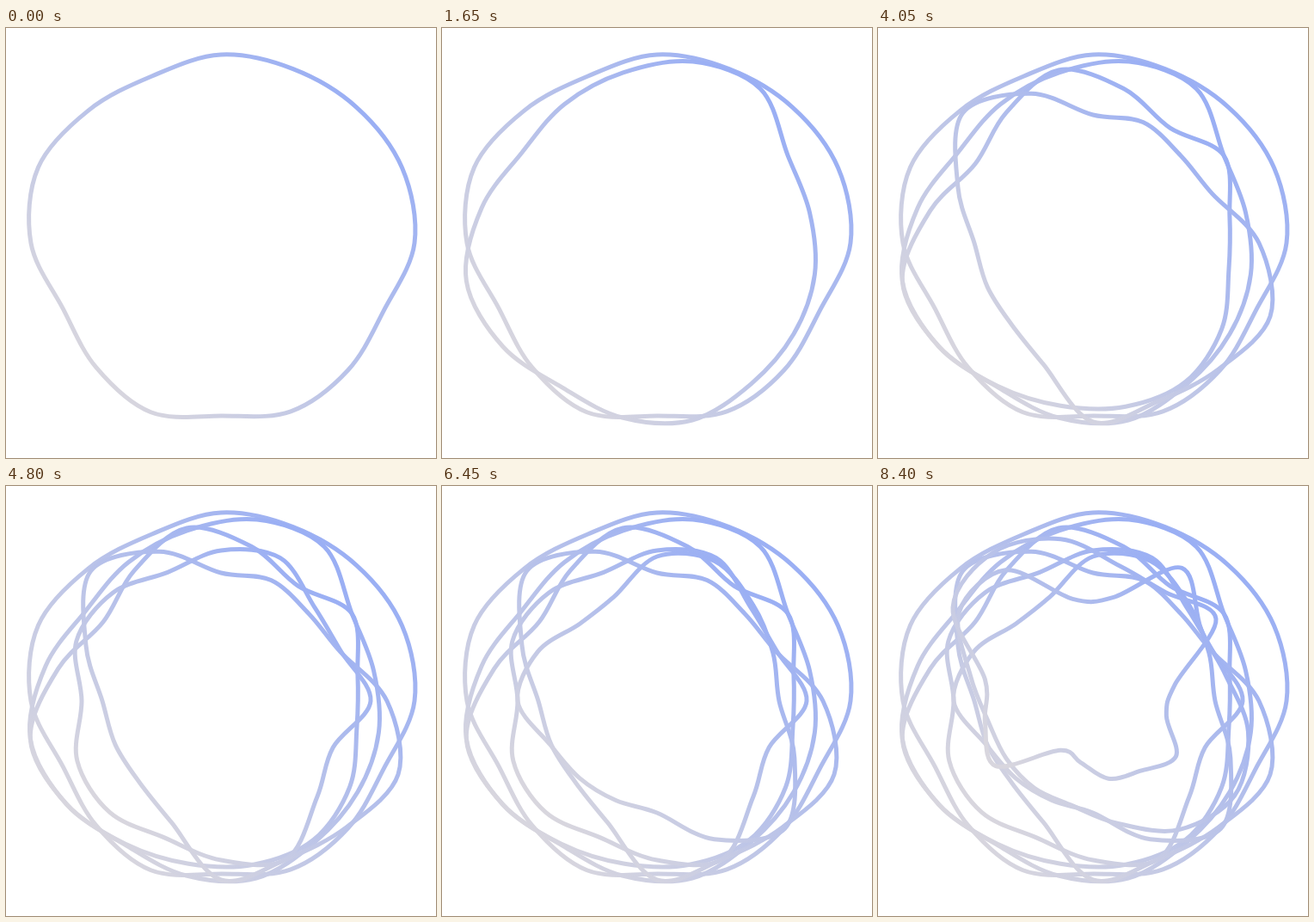
Write an HTML page with a canvas that moves like this. It is 500 by 500 pixels and loops after 9600 ms.

```html
<!DOCTYPE html>
<html lang="en">
<head>
<meta charset="utf-8">
<title>Rings</title>
<style>
html, body { margin: 0; width: 100%; height: 100%; overflow: hidden; background: #fff; }
canvas { display: block; width: 100%; height: 100%; }
</style>
</head>
<body>
<canvas id="stage" width="500" height="500"></canvas>
<script>
const SIZE = 500;
const LOOP = 9600;
const FIRST = 200;   // when the second ring starts to flicker
const GAP = 1200;    // time between two new rings
const BLINK = 250;   // length of one on or off phase
const SETTLE = 1000; // flicker time before a ring stays on
const INSET = 0.14;  // gradient ends, as a share of the ring's box

const ctx = document.getElementById('stage').getContext('2d');
ctx.lineWidth = 5;

// Anchors at equal angles, clockwise from the right; turn is in steps.
function anchors(turn, radii) {
  const step = 2 * Math.PI / radii.length;
  return radii.map((r, i) => {
    const angle = (i + turn) * step;
    return [SIZE / 2 + r * Math.cos(angle), SIZE / 2 + r * Math.sin(angle)];
  });
}

// Closed smooth path through all points.
function smooth(points) {
  const n = points.length;
  const at = i => points[(i + n) % n];
  const path = new Path2D();
  path.moveTo(...at(0));
  for (let i = 0; i < n; i++) {
    const [ax, ay] = at(i - 1), [bx, by] = at(i);
    const [cx, cy] = at(i + 1), [dx, dy] = at(i + 2);
    path.bezierCurveTo(
      bx + (cx - ax) / 6, by + (cy - ay) / 6,
      cx - (dx - bx) / 6, cy - (dy - by) / 6,
      cx, cy);
  }
  path.closePath();
  return path;
}

// Grey at the lower left to blue at the upper right of the ring's own box.
function shade(points) {
  const span = axis => {
    const values = points.map(p => p[axis]);
    const low = Math.min(...values), high = Math.max(...values);
    const pad = (high - low) * INSET;
    return [low + pad, high - pad];
  };
  const [left, right] = span(0), [top, bottom] = span(1);
  const ink = ctx.createLinearGradient(left, bottom, right, top);
  ink.addColorStop(0, '#d8d6de');
  ink.addColorStop(1, '#9aaff4');
  return ink;
}

function ring(turn, ...radii) {
  const points = anchors(turn, radii);
  return { path: smooth(points), ink: shade(points) };
}

const rings = [
  ring(0, 225, 205, 209, 212, 201, 213, 205, 199, 221, 230, 218, 210, 219, 219, 223, 228),
  ring(0.5, 187, 191, 197, 210, 207, 201, 216, 226, 208, 189, 194, 202, 215, 216, 183, 181),
  ring(0.5, 161, 180, 194, 194, 193, 200, 216, 226, 193, 165, 182, 205, 183, 161, 183, 162),
  ring(0, 193, 223, 207, 199, 208, 152, 134, 133, 138, 170, 214, 188, 149, 152, 144, 150),
  ring(0, 174, 141, 158, 199, 185, 172, 183, 181, 162, 182, 178, 162, 175, 180, 154, 151),
  ring(0, 142, 173, 210, 174, 130, 125, 127, 134, 162, 150, 127, 131, 168, 176, 158, 146),
  ring(0.5, 184, 198, 180, 145, 124, 122, 121, 124, 145, 187, 183, 121, 123, 186, 151, 157),
  ring(0.5, 87, 116, 98, 92, 73, 69, 136, 128, 128, 196, 208, 192, 160, 152, 172, 97),
];

function isLit(i, t) {
  if (i === 0) return true;
  const age = t - FIRST - (i - 1) * GAP;
  return age >= SETTLE || (age >= 0 && Math.floor(age / BLINK) % 2 === 0);
}

function draw(t) {
  ctx.fillStyle = '#fff';
  ctx.fillRect(0, 0, SIZE, SIZE);
  rings.forEach(({ path, ink }, i) => {
    if (!isLit(i, t)) return;
    ctx.strokeStyle = ink;
    ctx.stroke(path);
  });
}

const start = performance.now();
function tick() {
  draw((performance.now() - start) % LOOP);
  requestAnimationFrame(tick);
}
tick();
</script>
</body>
</html>
```
